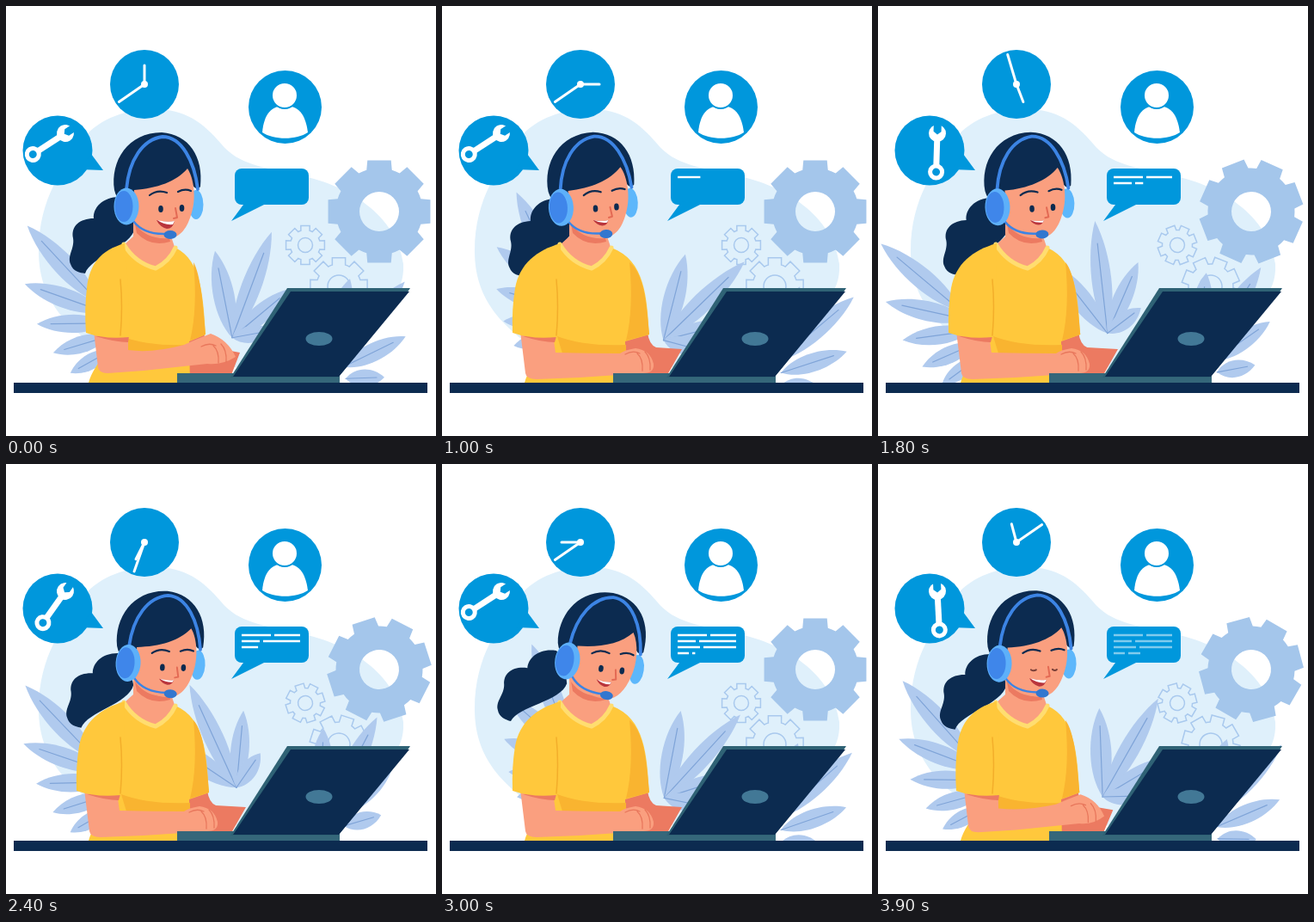
Animation, 500 px wide and 500 px high, one loop 4 s. Source, as an HTML page:

```html
<!DOCTYPE html>
<html lang="en">
<head>
<meta charset="utf-8">
<title>Support agent at work</title>
<style>
html, body { margin: 0; width: 100%; height: 100%; overflow: hidden; background: #fff; }
svg { display: block; width: 100vw; height: 100vh; }
.blue { fill: #0097dc; }
.navy { fill: #0c2b50; }
.skin { fill: #fa9f7f; }
.shade { fill: #ec7a61; }
.shirt { fill: #ffc83c; }
.dim { fill: #f9b430; }
.leaf { fill: #b0caee; }
.line { fill: none; stroke-linecap: round; stroke-linejoin: round; }
.vein { stroke: #7fa4d8; stroke-width: 1.2; }
.fold { stroke: #f3ae2b; stroke-width: 1.5; }
.crease { stroke: #e8775c; stroke-width: 1.3; }
.white { stroke: #fff; }
.brow { stroke: #0c2b50; stroke-width: 2.2; }
.band { stroke: #3c84e4; }
</style>
</head>
<body>
<svg viewBox="0 0 500 500">
  <clipPath id="above"><path d="M0 0H500V445H0Z"/></clipPath>
  <path fill="#dff0fb" d="M38 285C38 222 68 186 90 154C110 129 143 120 170 120C206 119 228 134 250 160C270 185 300 187 335 196C398 206 455 245 462 300C464 335 440 355 400 372L330 420H140C80 382 38 350 38 285Z"/>

  <g fill="none" stroke="#a9c9ee" stroke-width="1.5">
    <g id="gearA"/><g id="gearB"/>
  </g>
  <g id="gear" fill="#a4c6eb" fill-rule="evenodd"/>
  <g clip-path="url(#above)"><g id="left"/><g id="middle"/><g id="right"/></g>

  <g class="blue">
    <circle cx="161" cy="91" r="40"/>
    <circle cx="60" cy="168" r="40.5"/>
    <path d="M99 172L113 191L86 190Z"/>
    <circle cx="324.5" cy="117.5" r="42.5"/>
    <rect x="266" y="189" width="86" height="42" rx="8"/>
    <path d="M279 227L262 250L302 230Z"/>
  </g>
  <g class="line white" stroke-width="3">
    <path id="long" d="M161 91V55"/>
    <path id="short" d="M161 91V69"/>
  </g>
  <circle cx="161" cy="91" r="4" fill="#fff"/>
  <g id="wrench">
    <path d="M69 148V185" stroke="#fff" stroke-width="7"/>
    <circle cx="69" cy="148" r="10" fill="#fff"/>
    <circle cx="69" cy="193" r="9.5" fill="#fff"/>
    <circle class="blue" cx="69" cy="193" r="4.5"/>
    <path class="blue" d="M64.5 136H73.5V146L69 149.5L64.5 146Z"/>
  </g>
  <path fill="#fff" d="M298 147C300 125 309 116 324 116C340 116 348 125 351 147C338 156 311 156 298 147Z"/>
  <circle cx="324" cy="104" r="15" fill="#fff" stroke="#0097dc" stroke-width="2"/>
  <path id="typed" class="line white" stroke-width="2.4" style="stroke-linecap:butt"/>

  <g id="tail">
    <path class="navy" d="M132 222C112 222 101 235 102 247C86 247 75 256 78 270C80 282 71 290 75 300C78 309 86 310 92 311C98 292 146 280 150 258L142 228Z"/>
  </g>
  <path id="armR" class="shade"/>
  <path id="torso" class="shirt"/>
  <path id="side" class="dim"/>
  <path class="dim" d="M134 384Q165 396 214 394V404H140Z"/>
  <path class="skin" d="M148 240V268L138 277Q150 298 174 304Q190 296 196 280L190 262Z"/>
  <path class="shade" d="M150 253Q163 272 190 270L191 274Q168 281 152 264Z"/>
  <path class="line" stroke="#ffdd70" stroke-width="5" d="M137 277Q150 299 174 305Q190 297 197 281"/>
  <path id="armL" class="skin"/>
  <path id="armShade" class="shade"/>
  <path id="sleeve" class="shirt"/>
  <path class="line fold" d="M133 318Q136 350 133 383"/>

  <g id="head">
    <ellipse cx="221" cy="231" rx="8.5" ry="17" fill="#5db7fb"/>
    <path class="navy" d="M126 214C121 180 142 147 181 147C213 149 230 176 226 210C223 214 218 212 216 206L152 240C138 236 129 226 126 214Z"/>
    <path class="skin" d="M149 214C176 212 198 204 211 189C219 201 221 224 216 240C211 258 203 269 190 270C172 271 155 262 150 248Z"/>
    <path class="line brow" d="M167 220Q176 213 187 217M200 216Q208 212 215 215"/>
    <path class="line" stroke="#e36a54" stroke-width="2" d="M197 235L199 246L195 247"/>
    <g id="open" class="navy">
      <ellipse cx="180" cy="236" rx="2.8" ry="4"/>
      <ellipse cx="204.500" cy="235" rx="2.8" ry="4"/>
    </g>
    <path id="shut" class="line" stroke="#7a4038" stroke-width="2" d="M177 239Q180 241 183 239M202 238Q205 240 207 238"/>
    <g id="mouth">
      <path fill="#b9353c" d="M175 249Q187 252 196 250Q194 259 187 259Q179 257 175 249Z"/>
      <path fill="#fff" d="M176 249Q187 252 196 250L194 254Q184 255 176 249Z"/>
    </g>
    <path class="line band" stroke-width="3.8" d="M140 213C143 179 159 155 182 152C204 152 219 180 223 213"/>
    <path class="line band" stroke-width="2.5" d="M148 250Q160 266 186 265"/>
    <ellipse cx="191" cy="266" rx="7.5" ry="5" fill="#3277cf"/>
    <ellipse cx="140" cy="233" rx="14.5" ry="21.5" fill="#5db0fa"/>
    <ellipse cx="137" cy="233" rx="10.5" ry="18" fill="#3f86ea"/>
  </g>

  <path fill="#35677a" d="M199 427H388V439H199Z"/>
  <path fill="#2f6275" d="M327 328H470L466 334L386 432H261Z"/>
  <path class="navy" d="M331 332H469L387 431H264Z"/>
  <ellipse cx="364" cy="387" rx="15.5" ry="8" fill="#427896"/>
  <g id="fingers" class="line crease"><path d="M229 404Q236 410 235 424M238 402Q245 409 244 423M215 405Q224 400 232 404"/></g>
  <path class="navy" d="M9 438H490V450H9Z"/>
</svg>
<script>
const { sin, cos, abs, max, min, floor, PI } = Math;
const $ = id => document.getElementById(id);
const set = (id, name, value) => $(id).setAttribute(name, value);
const turn = (id, angle, x, y) => set(id, "transform", `rotate(${angle} ${x} ${y})`);
const rad = deg => deg * PI / 180;
// Clockwise from straight up.
const polar = (x, y, r, deg) => [x + r * sin(rad(deg)), y - r * cos(rad(deg))];

function gear(id, x, y, outer, inner, hole) {
  const arc = `A${inner} ${inner} 0 0 1 `;
  let d = "";
  for (let a = 0; a < 360; a += 45) {
    d += `${a ? arc : "M"}${polar(x, y, inner, a - 17)}L${polar(x, y, outer, a - 13)}`
       + `L${polar(x, y, outer, a + 13)}L${polar(x, y, inner, a + 17)}`;
  }
  d += `${arc}${polar(x, y, inner, -17)}Z`;
  d += `M${x - hole} ${y}a${hole} ${hole} 0 1 0 ${2 * hole} 0a${hole} ${hole} 0 1 0 ${-2 * hole} 0Z`;
  set(id, "data-teeth", 8);
  $(id).innerHTML = `<path d="${d}"/>`;
}

function leaf([x, y], [tx, ty], width) {
  const dx = tx - x, dy = ty - y, k = width * .68 / Math.hypot(dx, dy);
  const at = (along, side) => [x + dx * along - dy * k * side, y + dy * along + dx * k * side];
  return `<path class="leaf" d="M${x} ${y}C${at(.25, 1)} ${at(.7, 1)} ${tx} ${ty}`
       + `C${at(.7, -1)} ${at(.25, -1)} ${x} ${y}Z"/>`
       + `<path class="line vein" d="M${x} ${y}L${at(.8, 0)}"/>`;
}

// tip and base give [radius, angle] about the pivot for leaf i.
function plant(id, x, y, count, tip, base) {
  let out = "";
  for (let i = 0; i < count; i++)
    out += leaf(polar(x, y, ...base(i)), polar(x, y, ...tip(i)), 24 - 1.5 * i);
  $(id).innerHTML = out;
}

gear("gear", 434, 239, 61, 50.5, 23);
gear("gearA", 348, 278, 23, 17.5, 8.5);
gear("gearB", 387, 326, 34, 26, 13);
plant("left", 184, 439, 5, i => [243 * .82 ** i, -41 - 13.5 * i ** .83], i => [121 - 12 * i, -39 - 1.2 * i * i]);
plant("middle", 254, 375, 4, i => [125 - 34 * abs(i - 1), -7 + 33 * i], () => [14, 140]);
plant("right", 345, 435, 4, i => [165 - 35 * abs(i - 1), 25 + 21 * i], i => [50, 40 + 16 * i]);

// Four rows of two words each, typed at a steady rate.
function type(s) {
  const count = min(235, 3.3 * (s - 22));
  let d = "M0 0";
  for (let row = 0; row < 4; row++) {
    const y = 199 + 7 * row, end = min(68, count - 68 * row);
    const word = 34 - 4 * row - 9 * (row % 2);
    if (end > 0) d += `M274 ${y}h${min(word, end)}`;
    if (end > word + 4) d += `M${278 + word} ${y}h${end - word - 4}`;
  }
  set("typed", "d", d);
  set("typed", "opacity", min(1, (125 - s) / 20));
}

// q lifts the left hand, e widens the right sleeve.
function body(q, e) {
  const r = 232 + e;
  set("torso", "d", `M138 276C118 284 106 296 101 316L132 384C122 402 104 412 96 438H214L213 390L${r} 382`
    + `C${r - 3} 340 ${r - 4} 296 197 281Q190 297 174 305Q150 299 138 276Z`);
  set("side", "d", `M218 298C${r - 6} 312 ${r - 3} 345 ${r} 382L214 389Q223 352 218 298Z`);
  set("sleeve", "d", `M138 276C110 284 ${90 + 7 * q} 300 ${85 + 9 * q} 328`
    + `Q${81 + 10 * q} 352 ${82 + 11 * q} 380Q${105 + 10 * q} 388 ${133 + 10 * q} 385Q${138 + 6 * q} 335 138 276Z`);
  set("armL", "d", `M${91 + 11 * q} 378L${97 + 10 * q} ${427 - 7 * q}Q${98 + 10 * q} ${434 - 7 * q} ${110 + 8 * q} ${434 - 7 * q}L160 ${432 - 8 * q}`
    + `L234 ${427 - 11 * q}Q${247 + 4 * q} ${427 - 9 * q} ${246 + 21 * q} ${416 - 8 * q}`
    + `Q${242 + 16 * q} ${400 - 12 * q} ${225 + 13 * q} ${398 - 17 * q}Q${212 + 8 * q} ${400 - 12 * q} 207 ${404 - 10 * q}`
    + `Q170 404 ${132 + 10 * q} ${403 - 3 * q}L${129 + 13 * q} 382Z`);
  set("armShade", "d", `M${105 + 10 * q} 383L${133 + 10 * q} 384L${131 + 11 * q} 391Q${116 + 11 * q} 391 ${94 + 10 * q} 384Z`);
  set("armR", "d", `M212 384L${r - 2} 380Q${r} 394 ${r + 8} 397L${279 - 7 * q} ${399 + 4 * q}L262 429H212Z`);
  set("fingers", "transform", `translate(${14 * q - 2} ${-9 * q})`);
}

function draw(now) {
  // Thirty steps a second, thinned to thirteen poses and shown every 100 ms.
  const tick = floor(now % 4000 / 100) * 100;
  const p = floor(floor(max(0, tick % 1000 - 25) / 77) * 30 / 13);
  const s = floor(tick / 1000) * 30 + p;
  const wave = (n, lag = 0) => cos(rad(3 * n * s - lag));

  turn("long", 235.4 + 36 * s, 161, 91);
  turn("short", 3 * s, 161, 91);
  turn("wrench", 57 - 2.4 * p, 69, 148);
  turn("gear", 3 * s, 434, 239);
  turn("gearA", 3 * s, 348, 278);
  turn("gearB", -3 * s, 387, 326);

  const sway = .8 + 22.3 * wave(1, 4.5) + 27.1 * wave(2, 212);
  turn("left", 7.7 + 4.8 * wave(1, -28) + 12 * wave(2, 172), 184, 439);
  turn("middle", sway, 254, 375);
  turn("right", .32 * sway, 345, 435);

  const tilt = 1.5 - 5.5 * wave(1, 90) - 1.5 * wave(2);
  turn("head", tilt, 170, 270);
  set("tail", "transform", `translate(${-.8 * tilt} 0) rotate(${tilt} 170 270)`);
  const smile = .6 + .4 * wave(3);
  set("mouth", "transform", `translate(186 250) scale(${.6 + .4 * smile} ${.25 + .75 * smile}) translate(-186 -250)`);
  const blink = s > 112 && s < 118;
  set("open", "opacity", blink ? 0 : 1);
  set("shut", "opacity", blink ? 1 : 0);

  body((.5 + .5 * wave(1)) ** 12, 9 * abs(wave(1, 90)));
  type(s);
}

const start = performance.now();
function loop() {
  draw(performance.now() - start);
  requestAnimationFrame(loop);
}
loop();
</script>
</body>
</html>
```
